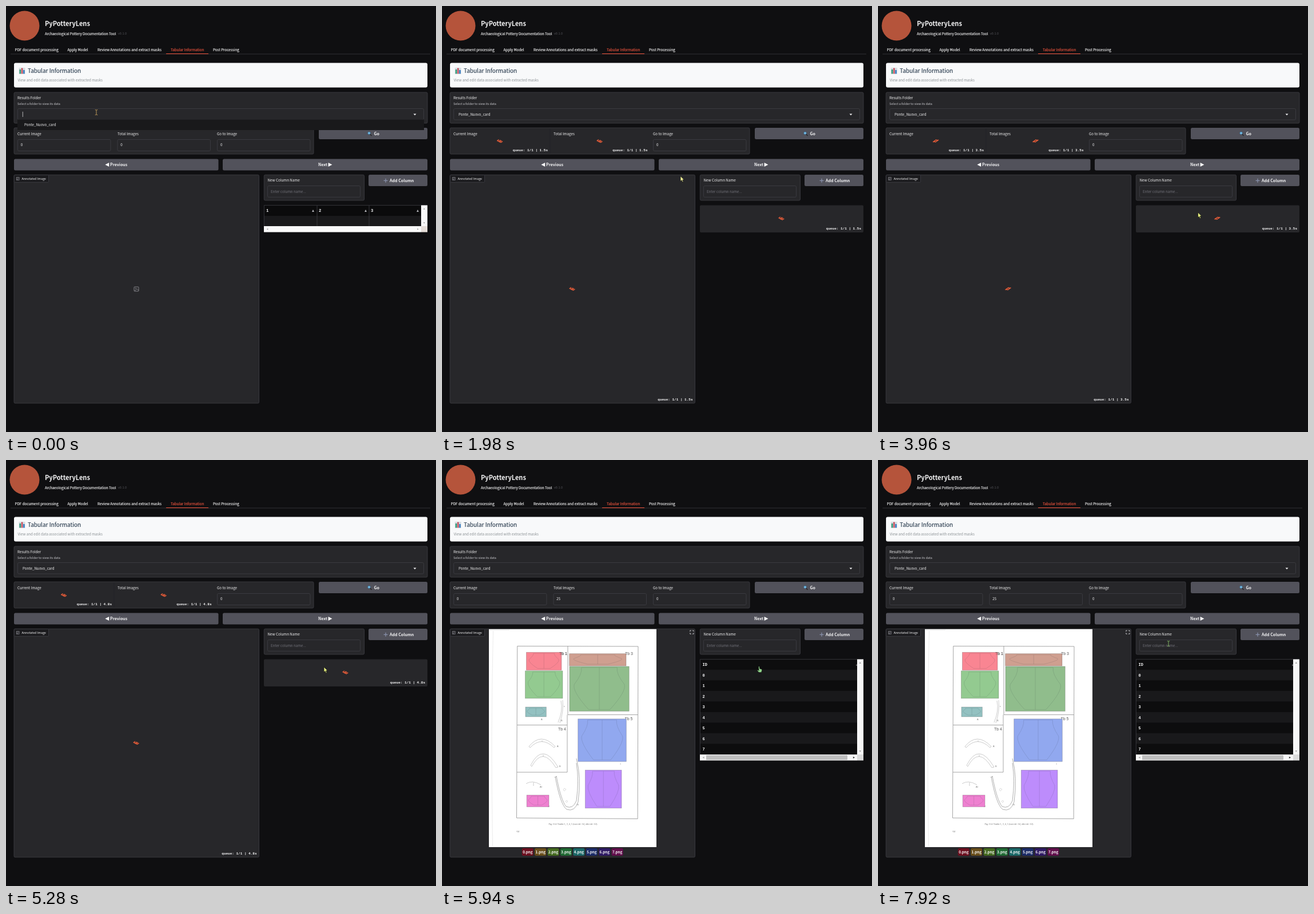
Animation, 752 px wide and 745 px high, one loop 8000 ms. Source, as an HTML page:

```html
<!DOCTYPE html>
<html lang="en">
<head>
<meta charset="utf-8">
<title>Tabular Information</title>
<style>
html, body { margin: 0; width: 100%; height: 100%; overflow: hidden; background: #0f0f11; }
svg { display: block; width: 752px; height: 745px; }
text { font-family: "Noto Sans CJK JP", "Noto Sans CJK SC", "Noto Sans", sans-serif; fill: #f4f4f5; white-space: pre; }
.bold { font-weight: 700; }
.medium { stroke: currentColor; stroke-width: .15; }
.mono { font-family: "Liberation Mono", "DejaVu Sans Mono", monospace; font-weight: 700; }
.arial { font-family: "Liberation Sans", Arial, sans-serif; }
.serif { font-family: "Liberation Serif", serif; }
</style>
</head>
<body>
<svg id="stage" viewBox="0 0 752 745"></svg>
<script>
const LOOP = 8000, STEP = 330;
const PANEL = '#27272a', LINE = '#3f3f46', BUTTON = '#52525b', MUTED = '#72727a';

const rect = (x, y, right, bottom, fill, stroke = 'none', r = 0) =>
  `<rect x="${x}" y="${y}" width="${right - x}" height="${bottom - y}" rx="${r}" fill="${fill}" stroke="${stroke}" stroke-width=".8"/>`;
const path = (d, fill = 'none', stroke = 'none', width = .8) =>
  `<path d="${d}" fill="${fill}" stroke="${stroke}" stroke-width="${width}"/>`;
// y is the middle of the capital letters
const text = (x, y, size, label, cls = '', fill = '#f4f4f5', anchor = 'start') =>
  `<text x="${x}" y="${y + size * .36}" font-size="${size}" class="${cls}" text-anchor="${anchor}" style="fill:${fill};color:${fill}">${label}</text>`;
const group = (id, body) => `<g id="${id}">${body}</g>`;
const panel = (x, y, right, bottom) => rect(x, y, right, bottom, PANEL, LINE, 2);
const button = (x, y, right, bottom) => rect(x, y, right, bottom, BUTTON, 'none', 2.5);
const triangle = (x, y, size, angle, fill) =>
  `<path d="M${-size} ${-size}L${size} 0L${-size} ${size}Z" fill="${fill}" transform="translate(${x} ${y}) rotate(${angle})"/>`;

function header() {
  const tabs = [[15.5, 'PDF document processing'], [107.5, 'Apply Model'],
    [160, 'Review Annotations and extract masks'], [288, 'Tabular Information'], [362, 'Post Processing']];
  return '<circle cx="32.5" cy="34.5" r="26" fill="#b5543b"/>' +
    text(68, 31, 11, 'PyPotteryLens', 'bold') +
    text(68, 48.3, 6.15, 'Archaeological Pottery Documentation Tool', 'medium') +
    text(196, 48.5, 5.5, 'v0.1.0', '', '#55555c') +
    tabs.map(([x, name], i) => text(x, 76.3, 6.27, name, 'medium', i === 3 ? '#f0553f' : '#f4f4f5')).join('') +
    path('M8 84H742', 'none', '#38383d') + path('M280 83.5H354', 'none', '#f0553f', 1.1) +
    rect(14, 99.5, 737, 142.5, '#f8f9fa', 'none', 3) +
    rect(22.5, 108, 33.5, 119, '#d5dde2') + rect(23.5, 111, 26, 118.5, '#2f9a78') +
    rect(26.8, 108.5, 29.3, 118.5, '#c84a58') + rect(30.1, 112, 32.6, 118.5, '#2d78c0') +
    text(38, 113.3, 10, 'Tabular Information', 'medium', '#2c3e50') +
    text(20.5, 129.5, 6.23, 'View and edit data associated with extracted masks', '', '#8a9094');
}

function controls() {
  return panel(14, 151, 737, 205) +
    text(20, 161, 6.27, 'Results Folder') +
    text(20, 171.2, 5.4, 'Select a folder to view its data', '', '#d0d0d5') +
    rect(20.5, 179.5, 730.5, 199, PANEL, LINE, 2) + path('M712.5 188.6H717.5L715 191.2Z', '#f4f4f5') +
    panel(14, 213, 538, 259) +
    text(20, 223.5, 6.27, 'Current Image') + text(195, 223.5, 6.27, 'Total Images') + text(369, 223.5, 6.27, 'Go to Image') +
    rect(369.5, 233.5, 532, 253.5, PANEL, LINE, 2) + text(375, 243, 6.2, '0') +
    button(547, 213, 737, 233) + text(643.5, 223, 7.05, 'Go', 'bold') +
    '<circle cx="635" cy="222.3" r="2.2" fill="#7cc4ea" stroke="#3c6f98" stroke-width=".9"/>' +
    path('M636.8 224.2L639.5 227', 'none', '#27272a', 1.4) +
    button(14, 267.5, 371.5, 287.5) + triangle(176.8, 277.5, 3.4, 180, '#fff') + text(182, 277.3, 7.05, 'Previous', 'bold') +
    button(379, 267.5, 737, 287.5) + text(546, 277.3, 7.05, 'Next', 'bold') + triangle(567, 277.5, 3.4, 0, '#fff') +
    panel(14, 295.3, 442.5, 694.7) +
    panel(451.3, 295.3, 626.5, 340) + text(457.5, 305, 6.27, 'New Column Name') +
    rect(457.5, 314.5, 619.5, 334.3, PANEL, LINE, 2) + text(463, 324.3, 6.2, 'Enter column name...', '', MUTED) +
    button(634, 295, 737, 315) + path('M660.5 305.3H667.5M664 301.8V308.8', 'none', '#8790aa', 1.3) +
    text(671, 305, 7.05, 'Add Column', 'bold');
}

const imageLabel = () => rect(14.3, 295.5, 74.5, 308.3, '#1b1b1e', LINE, 1) +
  rect(18.3, 299.7, 23, 304.3, 'none', '#85858c') + path('M19 304L22.8 300.8M20 299.7V304.2', 'none', '#85858c', .6) +
  text(27.5, 302, 5.35, 'Annotated Image');

const fields = (total) => [[20.5, 0], [195, total]].map(([x, value]) =>
  rect(x, 233.5, x + 162.5, 253.5, PANEL, LINE, 2) + text(x + 5.3, 243, 6.2, value)).join('');

function emptyTable() {
  return rect(451, 348.5, 726, 367, '#0b0b0c') + rect(451, 367, 726, 385, '#19191b') +
    path('M451.4 385V348.6H737M544 349V385M635 349V385', 'none', LINE) +
    [455, 547, 638].map((x, i) => text(x, 357, 7.2, i + 1, 'mono') + triangle(x + 82, 358, 1.9, -90, '#b4b4b8')).join('') +
    rect(726, 348.5, 737, 385, '#fafafa') + rect(451, 385, 726, 395.5, '#fafafa') + rect(726, 385, 737, 395.5, '#e6ded9') +
    triangle(731.3, 354.5, 1.3, -90, '#999') + triangle(731.3, 379.5, 1.3, 90, '#999') +
    triangle(457, 390.3, 1.3, 180, '#999') + triangle(720.5, 390.3, 1.3, 0, '#999');
}

const emptyImage = () => rect(224, 491.2, 232, 498.8, 'none', '#9a9aa0', 1) +
  path('M225 498L229 494.5L232 497.5', 'none', '#9a9aa0') + '<circle cx="226.7" cy="493.7" r=".8" fill="#9a9aa0"/>';

function loading() {
  const spots = [[101, 236, 185, 252], [275.5, 236, 359.5, 252], [227.5, 494.5, 438.5, 688], [593.3, 371.2, 733, 389]];
  return rect(451, 348.5, 737, 396, PANEL, 'none', 2) + path('M189 214V258', 'none', '#232326') +
    spots.map(([x, y, right, low]) =>
      `<path class="loader" transform="translate(${x} ${y})" fill="none" stroke="#e05a38" stroke-width="1.4"/>` +
      text(right, low, 6, '', 'mono queue', '#f4f4f5', 'end')).join('');
}

function results(id, rows, bottom) {
  let body = rect(451, 348.5, 726, bottom, '#0d0d0e') + text(455.5, 357, 7, 'ID', 'mono');
  for (let i = 0; i < rows; i++) {
    const y = 366.8 + i * 18.5;
    if (i % 2 === 0) body += rect(451, y, 726, Math.min(y + 18.5, bottom), '#19191b');
    body += text(455.5, y + 9.2, 7, i, 'mono');
  }
  const full = rows > 4, tone = full ? '#a0a0a0' : '#444';
  return group(id, body + path(`M451.3 ${bottom}V348.6H737`, 'none', LINE) + path('M725 360V357.5', 'none', '#ccc') +
    rect(726, 348.5, 737, bottom, '#f7f7f7') + (full ? '' : rect(727, 359.5, 736, 396, '#bfbfbf')) +
    rect(451, bottom, 726, bottom + 10.5, '#f7f7f7') + rect(726, bottom, 737, bottom + 10.5, '#dcdcdc') +
    rect(462, bottom + 1.2, 709, bottom + 9.4, '#bfbfbf') +
    triangle(731.3, 354.5, 1.6, -90, tone) + triangle(731.3, bottom - 5.5, 1.6, 90, tone) +
    triangle(457, bottom + 5.3, 1.6, 180, '#aaa') + triangle(720.5, bottom + 5.3, 1.6, 0, '#333'));
}

// x, y, right, bottom, colour on paper, colour on the dark panel
const masks = [
  [147.5, 336.3, 209, 367.5, '#f98592', '#780a1c'], [145.5, 368.8, 211, 416.8, '#93ca90', '#194f1f'],
  [222.7, 338.7, 322, 360, '#cf9f90', '#52251b'], [223, 361, 327.2, 439.3, '#90bd8c', '#183f19'],
  [146, 432, 182.3, 449, '#93c1c1'], [237.8, 452.8, 322.3, 527.3, '#91a8ef'],
  [250.5, 542.3, 314, 608.8, '#bd8cfc'], [148.2, 586, 187, 606.5, '#ee80d0']];

const darkMasks = () => masks.filter(m => m[5]).map(([x, y, r, b, , dark]) => rect(x, y, r, b, dark, dark)).join('');

function vessel(x, y, right, bottom) {
  const w = right - x, h = bottom - y, mid = x + w / 2;
  const side = s => `M${mid + s * w * .3} ${y + 2}Q${mid + s * w * .28} ${y + h * .16} ${mid + s * w * .42} ${y + h * .4}` +
    `Q${mid + s * w * .46} ${y + h * .55} ${mid + s * w * .18} ${bottom - 3}`;
  return path(`${side(-1)}${side(1)}M${mid} ${y + 2}V${bottom - 3}M${x + w * .2} ${y + 2}H${right - w * .2}` +
    `M${mid - w * .18} ${bottom - 3}H${mid + w * .18}`, 'none', 'rgba(40,50,60,.22)', .6);
}

function page() {
  const letters = [[173, 453.5, 'A'], [208, 455.5, 'B'], [213, 430.5, 'c'], [201, 500.5, 'A'], [205, 535.5, 'B'],
    [171, 571.5, 'AI'], [236, 602.5, 'N'], [311.5, 531.5, 'I'], [185, 606, 'D']];
  const titles = [[205, 338.5, 1], [320, 338.5, 3], [319.5, 452.5, 5], [203, 470.5, 4]];
  return group('page', rect(82, 295.8, 375, 677, '#fff') +
    path('M89.5 299Q85 480 88.5 675', 'none', '#e2e2e2', .7) + path('M83 297.5H118', 'none', '#ddd') +
    path('M131.7 325.5L343 326L342.2 627.5L130.5 626ZM220 325.5V445.5M219 445.5V546M220 445.5H342.7M131.3 463.5H219M131 546H219', 'none', '#909090', .8) +
    path('M152 501Q173 475 198 501L196 503Q174 482 154 503ZM155 534Q176 492 203 537L199 538Q176 500 157 536ZM175 490v3M177 515v4' +
      'M208 421Q212 438 203 459M211 420Q213 440 206 460M147 566Q158 559 173 568M160 564v6', 'none', '#aaa', .6) +
    path('M198 554Q207 603 218 611Q232 616 238 598Q244 555 235 522M200 553Q208 595 217 606Q229 611 235 596Q240 560 235 530M197 555l4-2', 'none', '#8f8f8f', .7) +
    path('M214 574l3 2-3 3-2-2ZM218 595l2 2-2 2-2-2Z', 'none', '#bbb', .5) +
    titles.map(([x, y, n]) => text(x, y, 7, 'Tb ' + n, 'arial', '#555')).join('') +
    letters.map(([x, y, l]) => text(x, y, 4, l, 'arial', '#777')).join('') +
    masks.map(([x, y, r, b, light]) => rect(x, y, r, b, light) + vessel(x, y, r, b) +
      `<g opacity=".28">${rect(x, y, r, b, 'none', '#222')}</g>`).join('') +
    text(205, 338.5, 7, 'Tb 1', 'arial', 'rgba(70,60,60,.65)') +
    text(186.5, 637, 4, 'Fig. 114: Tombe 1, 3, 4, 5 (vasi rid. 1/4, altri rid. 1/2).', 'serif', '#666') +
    text(130.5, 649, 4.5, '64', 'serif', '#666'));
}

function legend() {
  const tones = ['#6d1020', '#6a4f1c', '#456a20', '#206a34', '#1b6868', '#1c2c68', '#2f1a64', '#620f4c'];
  return tones.map((tone, i) => {
    const x = 149.8 + i * 22.4;
    return rect(x - 10, 679, x + 10, 692, tone, 'none', 2) + text(x, 685.3, 6.2, i + '.png', 'bold', '#f4f4f5', 'middle');
  }).join('') + path('M433.8 300V298.2H435.8M438 298.2H440V300M440 302.3V304.2H438M435.8 304.2H433.8V302.3', 'none', '#d4d4d8', .9);
}

const ARROW = 'M0 0V9L2.1 7.2L3.6 10.4L5.1 9.7L3.7 6.6L6.3 6.3Z';
const HAND = 'M-1.6-4.6Q-.6-5.8.2-4.4L.9-1L3.2-.6Q4.8 0 4.7 1.6L3.6 5.6H-.9L-3.9 2Q-3.6.7-2.2 1.4L-.9 2.2Z';
const BEAM = 'M-2.2-4.5Q0-4.6 0-3.4Q0-4.6 2.2-4.5M0-3.6V3.6M-2.2 4.5Q0 4.6 0 3.4Q0 4.6 2.2 4.5';

// time, x, y, shape, colour
const track = [
  [0, 158, 186, BEAM, '#b89558'], [330, 141, 201, ARROW, '#e0a062'], [660, 133, 202, ARROW, '#eba46c'],
  [990, 190, 222, ARROW, '#e9e58c'], [1980, 417, 297.5, ARROW, '#f0f09a'], [3300, 548, 354, ARROW, '#f0f09a'],
  [3960, 559.5, 361, ARROW, '#e6f080'], [5280, 556, 362, ARROW, '#e6f080'], [5610, 556, 365.5, HAND, '#b4f064'],
  [5940, 555, 366, HAND, '#90d38a'], [6930, 541, 352, HAND, '#90d38a'], [7260, 527, 341, ARROW, '#b8e080'],
  [7590, 512, 325, BEAM, '#7fb060'], [7920, 508, 321, BEAM, '#7fb060']];

const $ = id => document.getElementById(id);
$('stage').innerHTML = header() + controls() +
  group('blank', emptyTable() + emptyImage()) + group('zero', fields(0)) + group('loading', loading()) +
  group('done', fields(25) + legend()) + group('partial', darkMasks()) + page() +
  results('shortTable', 4, 438) + results('fullTable', 8, 515) + imageLabel() +
  group('chosen', text(29, 189.5, 6.2, 'Ponte_Nuovo_card')) +
  group('menu', rect(20, 198.5, 731, 217, '#19191b') + text(32, 208, 6.2, 'Ponte_Nuovo_card') + path('M29.3 184.8V194', 'none', '#f4f4f5', .7)) +
  '<path id="pointer" stroke-linejoin="round"/>';

const loaders = document.querySelectorAll('.loader'), queues = document.querySelectorAll('.queue');
const show = (id, on) => { $(id).style.display = on ? '' : 'none'; };

function drawPointer(t) {
  let i = track.length - 1;
  while (track[i][0] > t) i--;
  const [start, x, y, shape, tone] = track[i], next = track[i + 1] || track[i];
  const k = next === track[i] ? 0 : (t - start) / (next[0] - start);
  const pointer = $('pointer'), beam = shape === BEAM;
  pointer.setAttribute('d', shape);
  pointer.setAttribute('transform', `translate(${x + (next[1] - x) * k} ${y + (next[2] - y) * k})`);
  pointer.setAttribute('fill', beam ? 'none' : tone);
  pointer.setAttribute('stroke', beam ? tone : '#111');
  pointer.setAttribute('stroke-width', beam ? 1 : .7);
}

function drawLoaders(t) {
  const spread = Math.cos((t - 660) / 825 * 2 * Math.PI) > 0;
  const d = spread ? 'M-5 1.8L1.2-2.3M-1.2 2.3L5-1.8M-3.4 2L-1 .6M1-.6L3.4-2'
    : 'M-4.8-.2L-1.4-2.4M-2.5 1.2L1.6-1.5M-.9 2.1L3.2-.6M1.6 2.9L5 .7M-4.4-.6L2 2.6';
  const seconds = Math.max(0, (t - 520) * 1.01 / 1000).toFixed(1);
  loaders.forEach(l => l.setAttribute('d', d));
  queues.forEach(q => { q.textContent = `queue: 1/1 | ${seconds}s`; });
}

const origin = performance.now();
function draw(now) {
  const time = Math.max(0, now - origin) % LOOP;
  const t = Math.floor(time / STEP) * STEP;
  const waiting = t < 660, done = t >= 5610, full = t >= 5940;
  show('menu', waiting);
  show('blank', waiting);
  show('zero', waiting);
  show('chosen', !waiting);
  show('loading', !waiting && !done);
  show('done', done);
  show('partial', done && !full);
  show('shortTable', done && !full);
  show('page', full);
  show('fullTable', full);
  drawLoaders(t);
  drawPointer(t);
  requestAnimationFrame(draw);
}
draw(origin);
</script>
</body>
</html>
```
